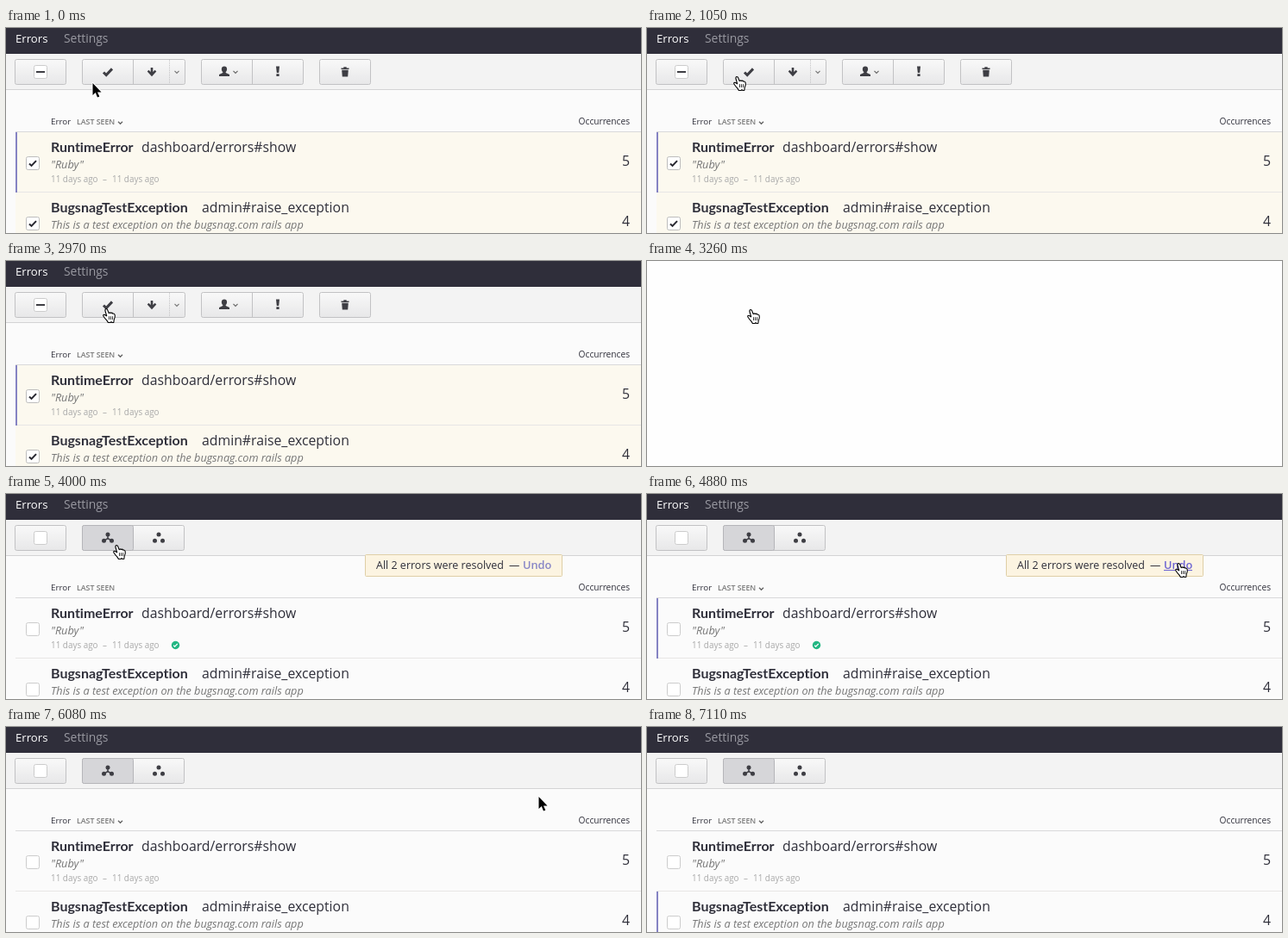
These frames come from a looping animation (736 px wide and 238 px high, 7410 ms). An HTML page with a canvas:

```html
<!DOCTYPE html>
<html lang="en">
<head>
<meta charset="utf-8">
<title>Resolve and undo</title>
<style>
  html, body { margin: 0; width: 100%; height: 100%; overflow: hidden; background: #fefefe; }
  canvas { display: block; width: 736px; height: 238px; }
</style>
</head>
<body>
<canvas id="stage" width="736" height="238"></canvas>
<script>
const ctx = document.getElementById('stage').getContext('2d');
const LOOP = 7410;
const SANS = '"Open Sans", "Noto Sans", sans-serif';
const BOLD = 'Lato, "Open Sans", sans-serif';
const INK = '#2f2f3a';
const ICON = '#3e3e44';
const BLANK = '#fefefe';

// Pointer stops: time, x, y, shape
const STOPS = [
  [0, 100, 64, 'arrow'], [150, 100, 62, 'arrow'], [300, 100, 60, 'arrow'],
  [900, 99, 59, 'hand'], [1050, 100, 56, 'hand'], [1190, 101, 52, 'hand'],
  [1340, 102, 49, 'hand'], [1480, 102, 51, 'hand'], [2230, 102, 52, 'hand'],
  [2530, 103, 52, 'hand'], [2680, 106, 53, 'hand'], [2820, 109, 54, 'hand'],
  [2970, 112, 55, 'hand'], [3120, 114, 56, 'hand'], [3260, 116, 56, 'hand'],
  [4000, 124, 59, 'hand'], [4150, 325, 135, 'arrow'], [4290, 531, 95, 'arrow'],
  [4590, 570, 88, 'arrow'], [4740, 604, 78, 'hand'], [4880, 612, 80, 'hand'],
  [6080, 617, 81, 'arrow'], [6520, 622, 92, 'arrow'], [6670, 642, 122, 'arrow'],
  [6820, 668, 165, 'arrow'], [6960, 695, 212, 'arrow'], [7110, 0, 0, 'none']
];

const HAND = new Path2D('M4.8 9.2L3 3Q2.6 .6 4.1 .5Q5.3 .5 5.9 2.2L7.2 5.6Q8.2 4.3 9.4 5.5' +
  'Q10.8 4.6 11.8 6.1Q13.6 5.7 14.2 7.6Q14.8 10 13.2 13.2L12.8 16.5H11L10 15.6L9 16.5H6.4' +
  'Q5.2 14 3.2 12.2L.9 9Q.4 7.4 1.6 7.2Q3 7.2 4.8 9.2');
const KNUCKLES = new Path2D('M7.5 9.2V13M9.5 9.2V13M11.5 9.2V13');
const ARROW = new Path2D('M.5 0V14L3.7 11L6 16.5L8.3 15.5L6 10.4H10.5Z');
const TICK = new Path2D('M-5 .5L-1.8 3.6L5 -3.6');
const CHEVRON = new Path2D('M-2.5 -1.2L0 1.3L2.5 -1.2');
const DOWN = new Path2D('M-1.3 -5H1.3V0L3.6 -2.2L5.3 -.5L0 5.2L-5.3 -.5L-3.6 -2.2L-1.3 0Z');
const PERSON = new Path2D('M0 -5.5C4.2 -5.5 3.5 -.2 1.7 1V2L6 4V6H-6V4L-1.7 2V1C-3.5 -.2 -4.2 -5.5 0 -5.5Z');
const BANG = new Path2D('M-2 -5.5H2L1.2 2H-1.2ZM-1.6 3.2H1.6V6H-1.6Z');
const TRASH = new Path2D('M-4.5 -4.5H-1.7V-5.7H1.7V-4.5H4.5V-3H-4.5ZM-3.8 -2.2H3.8L3.2 5.5H-3.2Z');

function text(str, x, y, size, color = INK, style = '', align = 'left', family = SANS) {
  ctx.font = `${style} ${size}px ${family}`;
  ctx.textRendering = family === BOLD ? 'optimizeSpeed' : 'auto'; // no ligatures in titles
  ctx.fillStyle = color;
  ctx.textAlign = align;
  ctx.fillText(str, x, y);
}

function rect(x, y, w, h, color) {
  ctx.fillStyle = color;
  ctx.fillRect(x, y, w, h);
}

function box(x, y, w, h, fill, stroke, radius = 2) {
  ctx.beginPath();
  ctx.roundRect(x + .5, y + .5, w - 1, h - 1, radius);
  ctx.fillStyle = fill;
  ctx.fill();
  ctx.strokeStyle = stroke;
  ctx.lineWidth = 1;
  ctx.stroke();
}

function at(x, y, draw) {
  ctx.save();
  ctx.translate(x, y);
  draw();
  ctx.restore();
}

function fillIcon(path, x, y, color = ICON) {
  at(x, y, () => { ctx.fillStyle = color; ctx.fill(path); });
}

function lineIcon(path, x, y, width, color = ICON, scale = 1) {
  at(x, y, () => {
    ctx.scale(scale, scale);
    ctx.strokeStyle = color;
    ctx.lineWidth = width;
    ctx.stroke(path);
  });
}

function dot(x, y, r, color = ICON) {
  ctx.beginPath();
  ctx.arc(x, y, r, 0, Math.PI * 2);
  ctx.fillStyle = color;
  ctx.fill();
}

function button(x, w) {
  const shade = ctx.createLinearGradient(0, 36, 0, 66);
  shade.addColorStop(0, '#f9f9f9');
  shade.addColorStop(1, '#e7e7e8');
  box(x, 36, w, 30, shade, '#c2c2c4');
}

function divider(x, dashed) {
  ctx.setLineDash(dashed ? [1, 1] : []);
  ctx.beginPath();
  ctx.moveTo(x + .5, 37);
  ctx.lineTo(x + .5, 65);
  ctx.strokeStyle = '#c2c2c4';
  ctx.lineWidth = 1;
  ctx.stroke();
  ctx.setLineDash([]);
}

function dots(x, joined) {
  const spots = [[0, -4], [-4.5, 3.3], [4.5, 3.3]];
  for (const [dx, dy] of spots) {
    dot(x + dx, 51 + dy, 2.5);
    if (!joined) continue;
    ctx.beginPath();
    ctx.moveTo(x, 51.5);
    ctx.lineTo(x + dx, 51 + dy);
    ctx.strokeStyle = ICON;
    ctx.lineWidth = 1.5;
    ctx.stroke();
  }
}

function checkbox(x, y, checked) {
  box(x, y, 16, 16, '#fff', checked ? '#bdbdbd' : '#cccccc');
  if (checked) lineIcon(TICK, x + 8, y + 8, 2.6, '#292932', .8);
}

function toolbar(selecting) {
  rect(0, 30, 736, 41, '#f3f3f3');
  rect(0, 71, 736, 1, '#d3d3d4');
  button(10, 60);
  checkbox(32, 43, false);
  if (selecting) {
    rect(35, 50, 10, 2, ICON);
    button(88, 120);
    divider(147);
    divider(189, true);
    lineIcon(TICK, 118, 51, 3);
    fillIcon(DOWN, 169, 51);
    lineIcon(CHEVRON, 198, 51, 1.2, '#777');
    button(226, 119);
    divider(285);
    fillIcon(PERSON, 253, 50);
    lineIcon(CHEVRON, 266, 51, 1.2, '#666');
    fillIcon(BANG, 315, 50);
    button(363, 60);
    fillIcon(TRASH, 393, 51);
  } else {
    button(88, 119);
    box(88, 36, 60, 30, '#d6d6d9', '#b5b5b9');
    dots(118, true);
    dots(177, false);
  }
}

function row(y, title, place, placeX, note, count, state, marked) {
  const { selecting, resolved } = state;
  rect(11, y, 725, 69, selecting ? '#fcf9ef' : '#fbfbfb');
  rect(11, y + 69, 725, 1, '#e7e6e5');
  if (marked) rect(11, y, 2, 70, '#8583c3');
  checkbox(23, y + 28, selecting);
  text(title, 52, y + 23, 16, INK, 'bold', 'left', BOLD);
  text(place, placeX, y + 23, 15.8);
  text(note, 52, y + 42, 12.7, '#777', 'italic');
  text(String(count), 723, y + 39, 15.8, INK, '', 'right');
  text('11 days ago', 52, y + 58, 9.9, '#a9a9a9');
  text('–', 112, y + 58, 9.9, '#a9a9a9');
  text('11 days ago', 123, y + 58, 9.9, '#a9a9a9');
  if (resolved) {
    dot(196.5, y + 54.5, 4.7, '#22b783');
    lineIcon(TICK, 196.5, y + 54.5, 3, '#fff', .45);
  }
}

function toast(hovered) {
  const link = hovered ? '#6c63d2' : '#8785c6';
  box(416, 70, 229, 26, '#fcf4e1', '#dfcfa6', 1);
  text('All 2 errors were resolved', 429, 87, 12.5);
  text('—', 583, 87, 12.3);
  text('Undo', 599, 87, 12.8, link, '600');
  if (hovered) rect(599, 88, 33, 1, link);
}

function page(t) {
  const state = { selecting: t < 3260, resolved: t >= 3410 && t < 5930 };
  const first = t < 3260 || (t >= 4150 && t < 5930) || (t >= 6670 && t < 6960);
  rect(0, 0, 736, 30, '#2f2e3a');
  text('Errors', 11, 17, 13.2, '#fff', '500');
  text('Settings', 67, 17, 13.9, '#9a9aa2');
  toolbar(state.selecting);
  text('Error', 52, 112, 9.8);
  text('LAST SEEN', 82, 112, 8.8, '#777', '600');
  if (t < 3260 || t >= 4150) lineIcon(CHEVRON, 132.5, 110, 1.4, '#666');
  text('Occurrences', 723, 112, 10.2, INK, '', 'right');
  rect(11, 120, 725, 1, '#d9d9da');
  row(121, 'RuntimeError', 'dashboard/errors#show', 157, '"Ruby"', 5, state, first);
  row(191, 'BugsnagTestException', 'admin#raise_exception', 227,
    'This is a test exception on the bugsnag.com rails app', 4, state, t >= 6960);
  if (state.resolved) {
    toast(t >= 4740);
    rect(0, 236, 736, 2, BLANK);
  }
}

function pointer(t) {
  const [, x, y, shape] = STOPS.findLast(stop => stop[0] <= t);
  if (shape === 'none') return;
  at(x, y, () => {
    ctx.lineJoin = 'round';
    if (shape === 'hand') {
      ctx.fillStyle = '#fff';
      ctx.fill(HAND);
      ctx.strokeStyle = '#000';
      ctx.lineWidth = 1.1;
      ctx.stroke(HAND);
      ctx.lineWidth = .8;
      ctx.stroke(KNUCKLES);
    } else {
      ctx.strokeStyle = '#fff';
      ctx.lineWidth = 2;
      ctx.stroke(ARROW);
      ctx.fillStyle = '#000';
      ctx.fill(ARROW);
    }
  });
}

function render(t) {
  const blank = (t >= 3260 && t < 3410) || (t >= 5930 && t < 6080);
  rect(0, 0, 736, 238, blank ? BLANK : '#fbfbfb');
  if (!blank) page(t);
  pointer(t);
}

const start = performance.now();
function tick() {
  render((performance.now() - start) % LOOP);
  requestAnimationFrame(tick);
}
tick();
</script>
</body>
</html>
```
